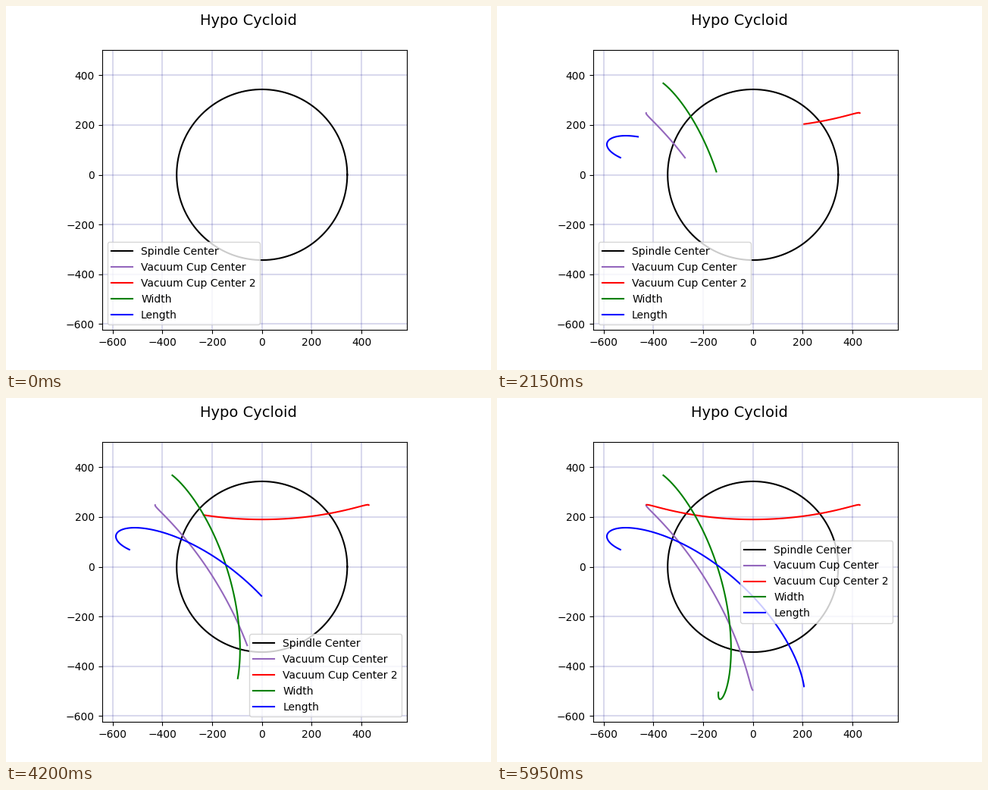
Write a matplotlib script that moves like this. It is 640 px wide and 480 px high and loops after 6 s.

```python
import numpy as np
import matplotlib.pyplot as plt
from matplotlib.animation import FuncAnimation

SPINDLE_R = 343      # radius of the spindle path
CUP_R = 153          # spindle to cup center
HALF_WIDTH = 138
HALF_LENGTH = 207
FRAMES = 120


def polar(radius, degrees):
    return radius * np.exp(1j * np.radians(degrees))


def cup_path(theta, phase):
    """Cup center: the arm turns back twice as fast as the spindle advances."""
    return polar(SPINDLE_R, phase + theta) + polar(CUP_R, phase - 2 * theta)


theta = np.arange(361)
cup = cup_path(theta, 150)
cup2 = cup_path(theta, 30)
width = cup + polar(HALF_WIDTH, 60 - 2 * theta)
length = cup + polar(HALF_LENGTH, 240 - 2 * theta)
spindle = polar(SPINDLE_R, np.linspace(0, 360, 150))

fig, ax = plt.subplots(figsize=(6.4, 4.8), dpi=100)
fig.suptitle("Hypo Cycloid", fontsize=14)
ax.set_aspect("equal")
ax.grid(color="darkblue", alpha=0.15, linewidth=1.5)


def add_curve(path, color, label):
    line, = ax.plot(path.real, path.imag, color=color, label=label)
    return line


# Whole curves are plotted first so that the axes limits fit all of them.
add_curve(spindle, "black", "Spindle Center")
curves = [
    (add_curve(cup, "tab:purple", "Vacuum Cup Center"), cup, 0),
    (add_curve(cup2, "red", "Vacuum Cup Center 2"), cup2, 1),
    (add_curve(width, "green", "Width"), width, 0),
    (add_curve(length, "blue", "Length"), length, 0),
]
ax.autoscale_view()
ax.legend(loc="best")


def update(frame):
    for line, path, lag in curves:
        count = frame - lag if frame > 1 else 0
        line.set_data(path.real[:count], path.imag[:count])
    return [line for line, _, _ in curves]


anim = FuncAnimation(fig, update, frames=FRAMES, interval=50,
                     init_func=lambda: update(0), repeat=True)
plt.show()
```
